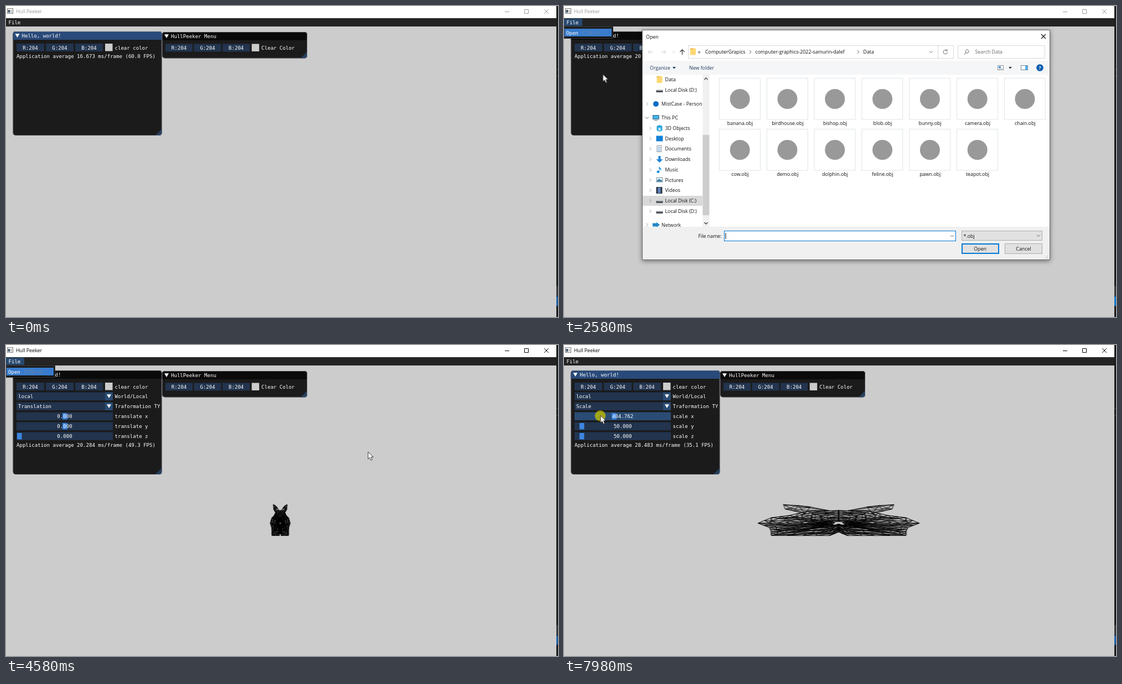
An HTML page that plays this animation: 997 px wide and 562 px high, repeating every 8000 ms.

```html
<!DOCTYPE html>
<html lang="en">
<head>
<meta charset="utf-8">
<title>Hull Peeker</title>
<style>
  html, body { margin: 0; width: 100%; height: 100%; overflow: hidden; background: #ccc; }
  svg { display: block; width: 100%; height: 100%; }
  text { white-space: pre; }
  .mono { font: 9.07px "DejaVu Sans Mono", monospace; fill: #fff; }
  .sans { font: 8.85px "Open Sans", sans-serif; fill: #111; }
  .mid { text-anchor: middle; }
  .line { fill: none; stroke: #666; }

  .step { animation: 8s step-end infinite; }
  .focus { animation-name: focus; }
  .edge { animation-name: edge; }
  .helloBar { animation-name: helloBar; }
  .fileHot { animation-name: fileHot; }
  .menu { animation-name: menu; }
  .openHot { animation-name: openHot; }
  .loaded { animation-name: loaded; }
  .fps { animation-name: fps; }
  .move { animation-name: move; }
  .scaleBefore { animation-name: scaleBefore; }
  .scaleAfter { animation-name: scaleAfter; }
  .mesh { animation-name: mesh; }
  .sliderHot { animation-name: sliderHot; }
  .drop { animation-name: drop; }
  .dropHot { animation-name: dropHot; }
  .fileHover { animation-name: fileHover; }
  .picked { animation-name: picked; }
  .caret { animation: caret 1.06s step-end infinite; }
  .caretOff { animation-name: caretOff; }
  .dialog { animation: dialog 8s linear infinite; filter: drop-shadow(0 2px 4px #0007); }
  .cursor { animation: cursor 8s ease-in-out infinite; }
  .press { animation-name: press; }

  @keyframes focus { 0% { color: #999 } 13.75% { color: #000 } 21.5% { color: #999 } 55%, 100% { color: #000 } }
  @keyframes edge { 0% { fill: #1f5ea3 } 13.75% { fill: #0f7bd0 } 55%, 100% { fill: #1f5ea3 } }
  @keyframes helloBar { 0% { opacity: 1 } 14.4% { opacity: 0 } 58%, 100% { opacity: 1 } }
  @keyframes fileHot { 0% { opacity: 0 } 10.6% { opacity: 1 } 58%, 100% { opacity: 0 } }
  @keyframes menu { 0% { opacity: 0 } 14.4% { opacity: 1 } 58%, 100% { opacity: 0 } }
  @keyframes openHot { 0% { opacity: 0 } 17%, 100% { opacity: 1 } }
  @keyframes loaded { 0% { opacity: 0 } 55%, 100% { opacity: 1 } }
  @keyframes fps { 0% { transform: none } 55%, 100% { transform: translateY(90px) } }
  @keyframes move { 0% { opacity: 1 } 80.6%, 100% { opacity: 0 } }
  @keyframes scaleBefore { 0% { opacity: 0 } 80.6% { opacity: 1 } 89.4%, 100% { opacity: 0 } }
  @keyframes scaleAfter { 0% { opacity: 0 } 89.4%, 100% { opacity: 1 } }
  @keyframes mesh {
    0% { transform: translate(495.3px, 0) }
    89.4%, 100% { transform: translate(496px, 0) scale(8.095, 1) }
  }
  @keyframes sliderHot { 0% { opacity: 0 } 84%, 100% { opacity: 1 } }
  @keyframes drop { 0% { opacity: 0 } 68.6% { opacity: 1 } 80.4%, 100% { opacity: 0 } }
  @keyframes dropHot { 0% { transform: none } 75%, 100% { transform: translateY(13.5px) } }
  @keyframes fileHover {
    0% { opacity: 0; transform: none } 40% { opacity: 1; transform: none }
    43.6% { opacity: 1; transform: translateX(86px) } 46.7% { opacity: 1; transform: translateX(172px) }
    48.4% { opacity: 1; transform: translateX(258px) } 49.8%, 100% { opacity: 1; transform: translateX(344px) }
  }
  @keyframes picked { 0% { opacity: 0 } 52%, 100% { opacity: 1 } }
  @keyframes caretOff { 0% { opacity: 1 } 52%, 100% { opacity: 0 } }
  @keyframes caret { 0% { opacity: 1 } 50%, 100% { opacity: 0 } }
  @keyframes dialog { 0%, 30% { opacity: 0 } 31.8%, 54.99% { opacity: 1 } 55%, 100% { opacity: 0 } }
  @keyframes cursor {
    0%, .49% { opacity: 0; transform: translate(896px, 504px) }
    .5% { opacity: 1; transform: translate(896px, 504px) }
    10.4% { transform: translate(10px, 29px) }
    13.5%, 14.6% { transform: translate(15px, 30px) }
    18%, 21.4% { transform: translate(28px, 48px) }
    26.6%, 28.6% { transform: translate(52px, 106px) }
    31% { transform: translate(44px, 118px); animation-timing-function: linear }
    38.5% { transform: translate(200px, 150px); animation-timing-function: linear }
    41% { transform: translate(300px, 175px); animation-timing-function: linear }
    45% { transform: translate(406px, 187px); animation-timing-function: linear }
    48.8% { transform: translate(600px, 191px) }
    50.6%, 57.3% { transform: translate(654px, 193px); animation-timing-function: linear }
    59.5% { transform: translate(588px, 190px) }
    67.5%, 68.8% { transform: translate(80px, 111px) }
    72.6% { transform: translate(68px, 130px) }
    77%, 80.6% { transform: translate(50px, 144px) }
    86.6%, 90.6% { transform: translate(91px, 131px); animation-timing-function: linear }
    99.75%, 100% { opacity: 1; transform: translate(66px, 127.5px) }
  }
  @keyframes press {
    0% { opacity: 0 } 13.5% { opacity: 1 } 15% { opacity: 0 } 19.8% { opacity: 1 } 21% { opacity: 0 }
    51.9% { opacity: 1 } 52.6% { opacity: 0 } 53.4% { opacity: 1 } 54.2% { opacity: 0 }
    68% { opacity: 1 } 69% { opacity: 0 } 80% { opacity: 1 } 81% { opacity: 0 } 89.2%, 100% { opacity: 1 }
  }
</style>
</head>
<body>
<svg id="stage" viewBox="0 0 997 562" preserveAspectRatio="none"></svg>
<script>
const rect = (x, y, w, h, fill, more = '') =>
  `<rect x="${x}" y="${y}" width="${w}" height="${h}" fill="${fill}" ${more}/>`;
const box = (x, y, w, h, fill, stroke, more = '') =>
  rect(x + .5, y + .5, w - 1, h - 1, fill, `stroke="${stroke}" ${more}`);
const path = (d, more = 'class="line"') => `<path d="${d}" ${more}/>`;
const text = (kind, x, y, s, more = '') => `<text class="${kind}" x="${x}" y="${y}" ${more}>${s}</text>`;
const mono = (x, y, s, more) => text('mono', x, y, s, more);
const sans = (x, y, s, more) => text('sans', x, y, s, more);
const step = (name, ...parts) => `<g class="step ${name}">${parts.join('')}</g>`;
const down = (x, y, r = 4) => path(`M${x - r} ${y - r * .8}h${2 * r}l${-r} ${r * 1.7}z`, 'fill="#fff"');
const chevron = (x, y) => path(`M${x - 1.5} ${y - 3}l3 3-3 3`);
const chevronDown = (x, y) => path(`M${x - 3} ${y - 1.5}l3 3 3-3`);

const FIELD = '#22344e', HOT = '#2a4c74', GRAB = '#3d85e0';

function appWindow() {
  return rect(0, 0, 997, 562, '#ccc') + rect(0, 0, 994, 22, '#fff') + rect(0, 22, 994, 15, '#242424') +
    box(2, 4, 11, 10, '#fff', '#777') + rect(3.5, 7, 4, 5, '#4b5b70') + rect(9, 7, 2, 5, '#bbb') +
    step('focus',
      text('sans', 18, 13, 'Hull Peeker', 'style="fill:currentColor"'),
      path('M901 10.5h8M936.5 6.5h7v7h-7zM972 6l8 8M980 6l-8 8', 'fill="none" stroke="currentColor"')) +
    rect(994, 0, 3, 562, '#1c1c1e') + rect(995, 114, 2, 1, '#555') + rect(995, 126, 2, 1, '#555') +
    rect(994, 506, 3, 18, '#38383c') + rect(994, 525, 3, 17, '#1f5ea3', 'class="step edge"') +
    step('fileHot', rect(0, 23, 33, 13, '#28496f')) + mono(4.5, 33, 'File');
}

function panel(x, y, w, h, title, activeBar = '') {
  const top = `M${x} ${y + 15}v-10q0-5 5-5h${w - 10}q5 0 5 5v10z`;
  return rect(x, y, w, h, '#1b1b1b', 'rx="5"') + path(top, 'fill="#0a0a0a"') +
    (activeBar && step(activeBar, path(top, 'fill="#294a7a"'))) +
    path(`M${x + w} ${y + h - 12}v7q0 5-5 5h-7z`, 'fill="#263e5c"') +
    rect(x + .5, y + .5, w - 1, h - 1, 'none', 'rx="5" stroke="#6e6e80" stroke-opacity=".5"') +
    down(x + 8, y + 7.5) + mono(x + 16, y + 11, title);
}

function colorRow(x, y, w, gap, label) {
  const fields = ['R', 'G', 'B'].map((c, i) =>
    rect(x + i * gap, y, w, 14, FIELD) + text('mono mid', x + i * gap + w / 2, y + 10.5, c + ':204'));
  return fields.join('') + rect(x + 3 * gap + 1, y, 13.5, 13.5, '#ccc') + mono(x + 3 * gap + 18.5, y + 10.5, label);
}

const combo = (y, value, label) => rect(19, y, 160, 14.5, FIELD) + rect(179, y, 14, 14.5, HOT) +
  down(186, y + 7) + mono(22, y + 10.5, value) + mono(196.5, y + 10.5, label);

const sliderY = i => 121.5 + i * 18;
const track = (i, value, grab, back = FIELD) => rect(19, sliderY(i), 174, 14.5, back) +
  rect(grab, sliderY(i) + 1.5, 8.5, 11.5, GRAB) + text('mono mid', 106, sliderY(i) + 10.5, value);

function tools() {
  const rows = (kind, values, grabs) => ['x', 'y', 'z'].map((axis, i) =>
    track(i, values[i], grabs[i]) + mono(196.5, sliderY(i) + 10.5, `${kind} ${axis}`));
  const hot = (value, grab) => step('sliderHot', track(0, value, grab, HOT));
  return step('loaded',
    combo(85.5, 'local', 'World/Local'),
    step('move', combo(103.5, 'Translation', 'Traformation TY'),
      ...rows('translate', ['0.000', '0.000', '0.000'], [102, 102, 20])),
    step('scaleBefore', combo(103.5, 'Scale', 'Traformation TY'),
      ...rows('scale', ['50.000', '50.000', '50.000'], [28, 28, 28]), hot('50.000', 28)),
    step('scaleAfter', combo(103.5, 'Scale', 'Traformation TY'),
      ...rows('scale', ['404.762', '50.000', '50.000'], [86, 28, 28]), hot('404.762', 86)),
    step('drop', rect(179, 103.5, 14, 14.5, '#4296fa'), down(186, 110.5),
      box(19, 120, 174, 47, '#141414f0', '#4a4a55'),
      rect(20.5, 123, 171, 13, '#3a7dcf', 'class="step dropHot"'),
      mono(22, 133, 'Translation'), mono(22, 146, 'Scale'), mono(22, 159.5, 'Rotation')));
}

function menu() {
  return step('menu', box(0, 37, 89, 22, '#141414f5', '#3c3c42'),
    step('openHot', rect(1, 41, 85, 14, '#397ccd')),
    mono(4, 52, 'Open'), text('mono', 33, 52, 'CTRL+O', 'style="fill:#8888"'));
}

// Body: jittered rings shrinking from half a silhouette to its middle, mirrored about x = 0.
function mesh() {
  let seed = 7;
  const jitter = size => ((seed = seed * 16807 % 2147483647) / 2147483647 - .5) * size;
  const mix = (a, b, t) => a + (b - a) * t;
  const lines = [];
  const wire = (a, b) => {
    for (const s of [-1, 1]) lines.push(`M${(s * a[0]).toFixed(2)} ${a[1].toFixed(1)}L${(s * b[0]).toFixed(2)} ${b[1].toFixed(1)}`);
  };
  const corners = [[0, 299], [7, 300.5], [11, 308], [15, 312], [18, 322], [15.4, 330], [15, 337],
    [15, 344], [8, 344.5], [2, 344.5], [0, 338]];
  const outline = corners.flatMap((a, i) => {
    const b = corners[i + 1];
    return b ? [a, [mix(a[0], b[0], .5), mix(a[1], b[1], .5)]] : [a];
  });
  const RINGS = 8, last = outline.length - 1;
  for (let layer = 0; layer < 2; layer++) {
    const rings = [...Array(RINGS).keys()].map(r => outline.map(([x, y], i) => {
      const inner = r > 0 && i > 0 && i < last;
      const t = r / RINGS;
      return [mix(x, 0, t) + (inner ? jitter(1.6) : 0), mix(y, 322, t) + (inner ? jitter(2.5) : 0)];
    }));
    rings.forEach((ring, r) => ring.forEach((p, i) => {
      if (i < last) wire(p, ring[i + 1]);
      if (r < RINGS - 1) wire(p, rings[r + 1][i]);
      if (r < RINGS - 1 && i < last) wire(p, rings[r + 1][i + 1]);
    }));
  }
  const ear = [[12.3, 288.5], [9, 290], [6.3, 292.5], [2, 299.5], [7.5, 304.5], [10, 300], [11.9, 296.5]];
  ear.forEach((a, i) => ear.slice(i + 1).forEach(b => wire(a, b)));
  return step('loaded', path(lines.join(''),
    'class="step mesh" fill="none" stroke="#000" stroke-width=".9" vector-effect="non-scaling-stroke"'));
}

const icons = {
  folder: (x, y) => rect(x + 1, y - 6, 10, 12, '#ffd772') + rect(x + 1, y - 6, 5, 2, '#eeb94a'),
  disk: (x, y) => rect(x, y, 12, 4, '#4b4f55') + rect(x + 1, y - 1, 10, 2, '#b9bdc2'),
  dot: (x, y) => `<circle cx="${x + 6}" cy="${y}" r="5" fill="#0f6cc4"/>`,
  screen: (x, y) => box(x, y - 5, 12, 8, '#42b2e8', '#476c86') + rect(x + 3, y + 4, 6, 1, '#476c86'),
  cube: (x, y) => path(`M${x + 1} ${y - 4}l5-2 5 2v8l-5 2-5-2z`, 'fill="#2ca5dd"') + rect(x + 4, y - 1, 4, 5, '#bfe8fa'),
  desk: (x, y) => rect(x, y - 5, 12, 10, '#1580d8'),
  page: (x, y) => box(x + 1, y - 6, 9, 12, '#fff', '#8a949e') + path(`M${x + 3} ${y - 2.5}h5m-5 3h5m-5 3h5`, 'stroke="#3e8acb"'),
  arrow: (x, y) => path(`M${x + 4} ${y - 6}h4v6h4l-6 6-6-6h4z`, 'fill="#2085d8"'),
  note: (x, y) => path(`M${x + 5} ${y - 6}q4 3 5 7l-2-1q-1-2-2-2v6a2.5 2 0 1 1-1-2z`, 'fill="#148bd8"'),
  photo: (x, y) => box(x, y - 5, 12, 9, '#dff1fb', '#8a949e') + path(`M${x + 1} ${y + 3}v-2l4-3 6 3v2z`, 'fill="#3f83a5"'),
  film: (x, y) => rect(x, y - 6, 11, 12, '#2d3440') + rect(x + 3, y - 5, 5, 10, '#5f87bd'),
  net: (x, y) => path(`M${x} ${y - 3}h7v-2l6 5-6 5v-2h-7z`, 'fill="#2589c4"'),
};

function navPane() {
  const items = [
    ['Data', 133, 'folder'], ['Local Disk (D:)', 152, 'disk'], ['MistCase - Personal', 177, 'dot'],
    ['This PC', 202, 'screen'], ['3D Objects', 221, 'cube'], ['Desktop', 239.5, 'desk'],
    ['Documents', 258, 'page'], ['Downloads', 277, 'arrow'], ['Music', 296, 'note'],
    ['Pictures', 314.5, 'photo'], ['Videos', 333, 'film'], ['Local Disk (C:)', 352, 'disk'],
    ['Local Disk (D:)', 371, 'disk'], ['Network', 395.5, 'net'],
  ];
  const rows = items.map(([name, y, icon], i) => {
    const root = [2, 3, 13].includes(i), x = root ? 160 : 166.5;
    const mark = i < 2 ? '' : i === 3 ? chevronDown(150, y) : `<g opacity=".6">${chevron(root ? 150 : 156, y)}</g>`;
    return mark + icons[icon](x, y) + sans(x + 16, y + 3.2, name);
  });
  return `<clipPath id="nav"><rect x="142" y="124" width="108" height="275"/></clipPath><g clip-path="url(#nav)">` +
    rect(142, 343, 108, 18, '#d9d9d9') + rows.join('') + '</g>' +
    rect(250.5, 124, 12, 275, '#f0f0f0') + rect(250.5, 233, 12, 145, '#cdcdcd') +
    path('M253.5 133l3-3 3 3M253.5 391l3 3 3-3', 'fill="none" stroke="#444" stroke-width="1.4"');
}

function files() {
  const names = ['banana', 'birdhouse', 'bishop', 'blob', 'bunny', 'camera', 'chain',
    'cow', 'demo', 'dolphin', 'feline', 'pawn', 'teapot'];
  const tiles = names.map((name, i) => {
    const x = 280 + i % 7 * 85.8, y = i < 7 ? 130 : 222;
    return box(x, y, 75, 75.5, 'none', '#dfe3e6') + `<circle cx="${x + 37.7}" cy="${y + 38}" r="18" fill="#999"/>` +
      text('sans mid', x + 38, y + 84.5, name + '.obj');
  });
  return step('fileHover', rect(277, 128, 81, 91, '#e1f1fd')) +
    step('picked', box(620.5, 128, 81, 91, '#cce8ff', '#99d1ff')) + tiles.join('');
}

function dialog() {
  const navy = 'style="fill:#1e395b"';
  const head = rect(141, 43, 737, 416, '#fff') + sans(148, 58.5, 'Open') +
    path('M862 51l8 8M870 51l-8 8', 'stroke="#111" stroke-width="1.1"') +
    path('M161 83h-9m4-4l-4 4 4 4M175 83h9m-4-4l4 4-4 4M196 82l2 2 2-2', 'fill="none" stroke="#ccc"') +
    path('M213.5 88v-9m-4 4l4-4 4 4', 'fill="none" stroke="#444" stroke-width="1.3"') +
    box(224, 71, 480, 24, '#fff', '#d9d9d9') + rect(675, 72, 1, 22, '#d9d9d9') + icons.folder(227, 82.5) +
    sans(242, 86, '«') + sans(255, 86, 'ComputerGrapics') + chevron(336.5, 83) +
    sans(345.5, 86, 'computer-graphics-2022-samurin-dalef') + chevron(531.5, 83) + sans(540.5, 86, 'Data') +
    chevronDown(663, 83) + path('M691.5 80.5a3.7 3.7 0 1 0 1 3M692 78v3h-3') +
    box(711, 71, 158, 24, '#fff', '#d9d9d9') + path('M726 84l-3 4m3-4a3 3 0 1 1 2 1 3 3 0 0 1-2-1') +
    text('sans', 742.5, 86, 'Search Data', 'style="fill:#666"');
  const bar = rect(142, 99, 735, 25, '#f5f6f7') + sans(155, 115, 'Organize', navy) +
    path('M196 110h6l-3 3.5z', 'fill="#1e395b"') + sans(226, 115, 'New folder', navy) +
    box(783, 107, 11, 9, '#fff', '#8a949e') + rect(785, 109, 4, 3, '#3e8acb') + rect(785, 113, 7, 1, '#999') +
    path('M803 110h6l-3 3.5z', 'fill="#333"') + box(825, 107, 13, 9, '#fff', '#6c8ba5') + rect(833, 108, 4, 7, '#55b0e8') +
    '<circle cx="859.5" cy="111.5" r="6.3" fill="#0b5cad"/>' +
    text('sans mid', 859.5, 115, '?', 'style="fill:#fff;font-weight:700"');
  const foot = rect(142, 399, 735, 59, '#f0f0f0') + sans(242.5, 418.5, 'File name:') +
    box(289, 406, 419, 19, '#fff', '#0078d7') + chevronDown(701, 415.5) +
    step('picked', sans(292.5, 418.5, 'bunny.obj')) +
    step('caretOff', rect(291.5, 410, 1, 11, '#000', 'class="caret"')) +
    box(718, 406, 146, 18, '#e1e1e1', '#adadad') + sans(721.5, 418.5, '*.obj') + chevronDown(857, 415) +
    rect(719, 430, 66, 17, '#e1e1e1', 'stroke="#0078d7" stroke-width="2"') + text('sans mid', 751.5, 442, 'Open') +
    box(796, 429, 68, 19, '#e1e1e1', '#adadad') + text('sans mid', 830, 442, 'Cancel') +
    path('M869 456l6-6m-3 6l3-3', 'stroke="#999" stroke-dasharray="1 1"');
  return `<g class="dialog">${head + bar + navPane() + files() + foot + box(141, 43, 737, 416, 'none', '#6e6e6e')}</g>`;
}

const cursor = () => '<g class="cursor">' +
  step('press', '<circle cx="-.5" cy=".5" r="9.7" fill="#c8c200" opacity=".76"/>') +
  path('M0 0V13.2l3-2.8 2.2 4.9 2.3-1-2.2-4.8h4.1z', 'fill="#fff" stroke="#111" stroke-width=".8"') + '</g>';

document.getElementById('stage').innerHTML = appWindow() + mesh() +
  panel(282, 47, 262, 47.5, 'HullPeeker Menu') + colorRow(288, 68.5, 49, 51.6, 'Clear Color') +
  panel(12.5, 46, 269, 188, 'Hello, world!', 'helloBar') + colorRow(19, 68, 50, 53, 'clear color') +
  step('fps', mono(19, 94, '', 'id="fps"')) + tools() + menu() + dialog() + cursor();

const LOOP = 8000;
const frameTimes = [[0, 16.673], [830, 16.673], [1700, 20.146], [4400, 20.146], [4580, 20.284],
  [5810, 48.563], [6930, 50.57], [7150, 50.6], [7980, 28.483], [8000, 28.2]];
const fpsText = document.getElementById('fps');
let start;

function tick(now) {
  start ??= now;
  const t = (now - start) % LOOP;
  const i = frameTimes.findIndex(k => k[0] > t);
  const [[t0, a], [t1, b]] = [frameTimes[i - 1], frameTimes[i]];
  const ms = a + (b - a) * (t - t0) / (t1 - t0);
  fpsText.textContent = `Application average ${ms.toFixed(3)} ms/frame (${(1000 / ms).toFixed(1)} FPS)`;
  requestAnimationFrame(tick);
}
requestAnimationFrame(tick);
</script>
</body>
</html>
```
